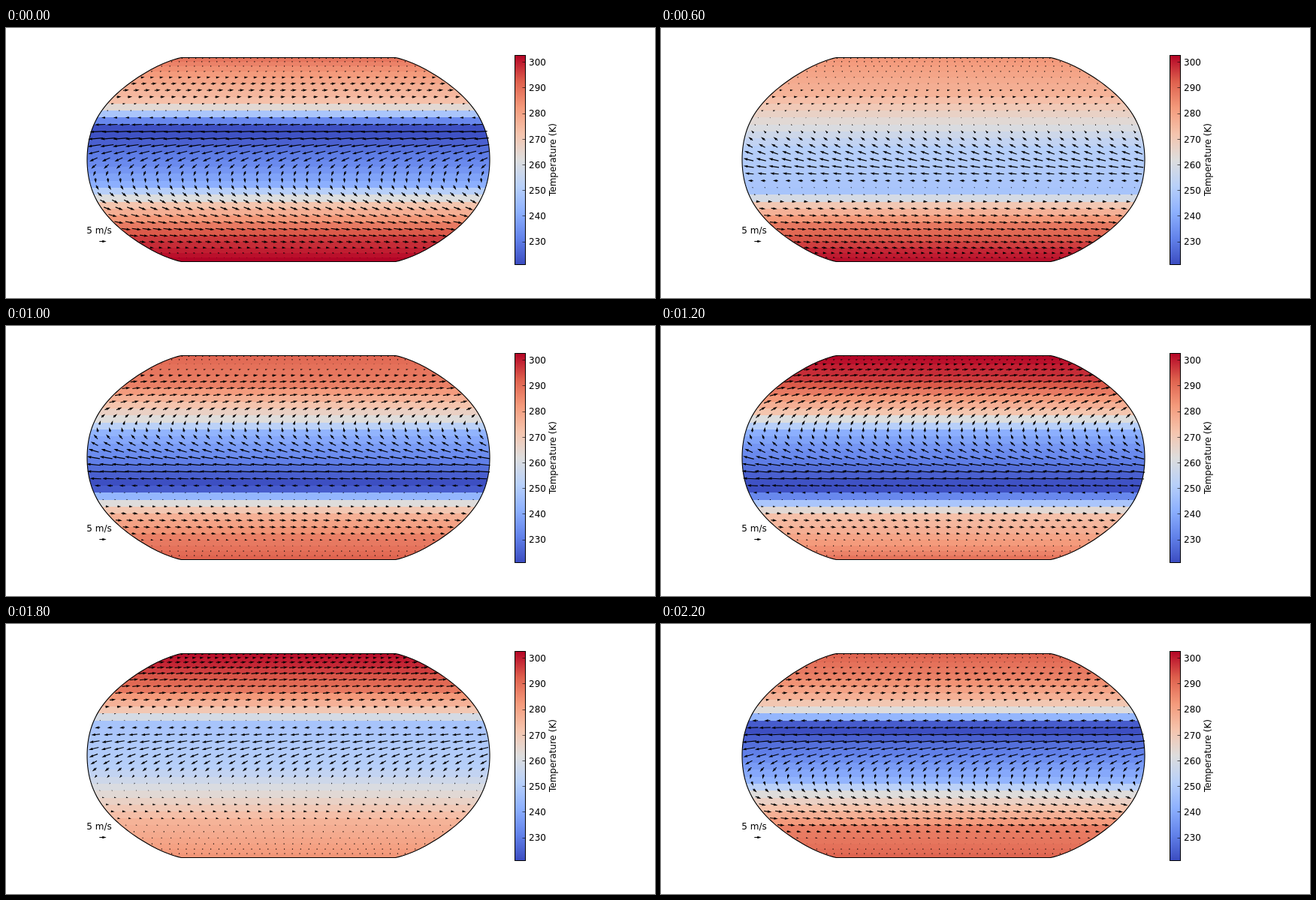
Write an HTML page that moves like this. It is 864 px wide and 360 px high and loops after 2.4 s.

```html
<!DOCTYPE html>
<html lang="en">
<head>
<meta charset="utf-8">
<title>Seasonal winds</title>
<style>
  html, body { margin: 0; width: 100%; height: 100%; overflow: hidden; background: #fff; }
  svg { display: block; width: 864px; height: 360px; }
  text { font: 12px "DejaVu Sans", sans-serif; }
</style>
</head>
<body>
<svg viewBox="0 0 864 360">
  <defs>
    <clipPath id="globe"><path class="rim"/></clipPath>
    <clipPath id="axes"><rect x="107.5" y="39" width="537" height="273"/></clipPath>
    <linearGradient id="scale" x1="0" y1="1" x2="0" y2="0"></linearGradient>
  </defs>
  <g id="bands" clip-path="url(#globe)" shape-rendering="crispEdges"></g>
  <path id="arrows" clip-path="url(#axes)"/>
  <path class="rim" fill="none" stroke="#000" stroke-width="1.1"/>
  <text x="124" y="274" text-anchor="middle">5 m/s</text>
  <path id="sample"/>
  <rect x="677.5" y="36.5" width="14" height="279" fill="url(#scale)" stroke="#000"/>
  <g id="ticks"></g>
  <text transform="translate(732 175.5) rotate(-90)" text-anchor="middle">Temperature (K)</text>
</svg>
<script>
const FRAME = 200, FRAMES = 12, HALF_YEAR = 6;
const CX = 376, CY = 175.5, HALF_W = 268, HALF_H = 136;
const ROWS = 32, COLUMNS = 32, ROW_STEP = 2 / 32.5; // row step as a share of 90 degrees
const T_MIN = 221.4, T_MAX = 302.8;
const COOLWARM = ["3b4cc0", "6282ea", "8db0fe", "b8d0f9", "dddddd",
  "f5c4ad", "f49a7b", "de604d", "b40426"];

// heat: [row, kelvin] corners of the profile, north to south.
// winds: bumps over the rows, [centre, peak, spread to north, spread to south].
const solstice = {
  heat: [[15.5, 289], [8, 272], [4.8, 222], [3.5, 222.5], [-3.5, 241.5],
    [-6.5, 272], [-11, 296], [-15.5, 303]],
  easterly: [3.4, -21, 1.3, 3.8], northWest: [9.8, 8, 1.8, 1.9],
  southWest: [-10.5, 12.5, 5, 2.3], crossing: [-3, -6.3, 3.4, 3.5]
};
const peak = {
  heat: [[15.5, 286], [11.5, 282], [7.5, 266], [5, 232.5], [3.5, 231],
    [-3.5, 249], [-6.5, 272], [-11.5, 302], [-15.5, 304]],
  easterly: [3.5, -16, 1.9, 4.5], northWest: [10, 5, 1.8, 1.5],
  southWest: [-11.5, 13, 5.2, 2.7], crossing: [-2.2, -6.3, 3.8, 3.5]
};
const equinox = {
  heat: [[15.5, 283], [9.5, 276.5], [1.5, 251.5], [-4.5, 248], [-6.5, 271],
    [-9.5, 288.5], [-13.5, 299], [-15.5, 301.5]],
  easterly: [-1.5, -14.5, 3, 2.1], northWest: [8.4, 5, 1.6, 2.2],
  southWest: [-10.8, 11.8, 4, 2.9], crossing: [1.8, 4.8, 2, 2.7]
};
const turning = {
  heat: [[15.5, 291.5], [10.5, 287], [5.5, 262.5], [3.5, 243], [-3.5, 222],
    [-4.5, 224.5], [-6.5, 262.5], [-8, 275.5], [-11.5, 287], [-15.5, 292]],
  easterly: [-2.3, -20, 3.6, 1.7], northWest: [9.5, 11, 1.9, 4.2],
  southWest: [-10, 9, 2.3, 1.9], crossing: [3.2, 6, 2.4, 3]
};
// Each step averages the states listed for it; the second half year mirrors the first
const STEPS = [[solstice], [peak], [peak, equinox], [equinox], [equinox, turning], [turning]];

const el = id => document.getElementById(id);
const mix = (a, b, t) => a + (b - a) * t;

// Polynomial fit of the Robinson projection; s runs from -1 to 1 between the poles
function halfWidth(s) {
  const q = s * s;
  return HALF_W * (1 - q * (.308 + q * (.5554 + q * (-.6096 + q * .214))));
}
function latY(s) {
  const a = Math.abs(s);
  return CY - Math.sign(s) * HALF_H * (1.116 * a - .116 * a ** 6.3);
}

function bump(row, [centre, height, north, south]) {
  const d = (row - centre) / (row > centre ? north : south);
  return height * Math.exp(-d * d / 2);
}

function heatAt(state, row) {
  const i = Math.max(1, state.heat.findIndex(corner => corner[0] <= row));
  const [r0, t0] = state.heat[i - 1], [r1, t1] = state.heat[i];
  return mix(t0, t1, (row - r0) / (r1 - r0));
}

function climate(state, row) {
  const north = bump(row, state.northWest), south = bump(row, state.southWest);
  return {
    heat: heatAt(state, row),
    u: bump(row, state.easterly) + north + south,
    v: bump(row, state.crossing) + .1 * (north - south)
  };
}

function sample(step, row) {
  const flip = step < HALF_YEAR ? 1 : -1;
  const parts = STEPS[step % HALF_YEAR].map(state => climate(state, row * flip));
  const mean = key => parts.reduce((sum, part) => sum + part[key], 0) / parts.length;
  return { heat: mean("heat"), u: mean("u"), v: mean("v") * flip };
}

function heatColor(kelvin) {
  const last = COOLWARM.length - 1;
  const p = Math.max(0, Math.min(1, (kelvin - T_MIN) / (T_MAX - T_MIN))) * last;
  const i = Math.min(last - 1, Math.floor(p));
  const channel = (hex, c) => parseInt(hex.slice(c * 2, c * 2 + 2), 16);
  return `rgb(${[0, 1, 2].map(c =>
    Math.round(mix(channel(COOLWARM[i], c), channel(COOLWARM[i + 1], c), p - i)))})`;
}

// Arrow centred on (x, y); short ones shrink as a whole, tiny ones become dots
function arrow(x, y, u, v) {
  const w = 1.15, head = 5 * w, length = Math.hypot(u, v);
  if (length < w) return `M${x - w / 2} ${y - w / 2}h${w}v${w}h${-w}Z`;
  const s = Math.min(1, length / head), tip = length / 2;
  const neck = tip - 4.5 * w * s, barb = tip - head * s, h = w * s / 2;
  const points = [[-tip, h], [neck, h], [barb, 3 * h], [tip, 0],
    [barb, -3 * h], [neck, -h], [-tip, -h]];
  const c = u / length, n = -v / length;
  return "M" + points.map(([px, py]) =>
    `${(x + px * c - py * n).toFixed(2)} ${(y + px * n + py * c).toFixed(2)}`).join("L") + "Z";
}

function make(tag, parent, attributes) {
  const node = document.createElementNS("http://www.w3.org/2000/svg", tag);
  for (const name in attributes) node.setAttribute(name, attributes[name]);
  return parent.appendChild(node);
}

const east = [], west = [];
for (let i = -50; i <= 50; i++) {
  const s = i / 50, w = halfWidth(s), y = latY(s);
  east.push(`${CX + w} ${y}`);
  west.unshift(`${CX - w} ${y}`);
}
document.querySelectorAll(".rim").forEach(path =>
  path.setAttribute("d", `M${[...east, ...west].join("L")}Z`));

COOLWARM.forEach((hex, i) => make("stop", el("scale"),
  { offset: i / (COOLWARM.length - 1), "stop-color": "#" + hex }));
for (let kelvin = 230; kelvin <= 300; kelvin += 10) {
  const y = 45.6 + (300 - kelvin) * 3.42;
  make("path", el("ticks"), { d: `M687.5 ${Math.floor(y) + .5}h4`, stroke: "#000", "stroke-width": .6 });
  make("text", el("ticks"), { x: 696, y: Math.round(y + 4.4) }).textContent = kelvin;
}
el("sample").setAttribute("d", arrow(129, 284.5, 9.4, 0));

// Each band has its row of arrows along the northern edge
const bands = Array.from({ length: ROWS }, (_, i) => {
  const row = (ROWS - 1) / 2 - i, edge = (row + .5) * ROW_STEP;
  const y = latY(edge);
  const top = i ? y : CY - HALF_H;
  const bottom = i < ROWS - 1 ? latY(edge - ROW_STEP) : CY + HALF_H;
  const rect = make("rect", el("bands"), { x: 100, y: top, width: 552, height: bottom - top });
  return { row, y, rect, reach: halfWidth(edge) };
});

function draw(step) {
  let arrows = "";
  for (const { row, y, rect, reach } of bands) {
    const { heat, u, v } = sample(step, row);
    rect.setAttribute("fill", heatColor(heat));
    for (let i = 0; i < COLUMNS; i++) {
      arrows += arrow(CX + reach * ((2 * i + 1) / COLUMNS - 1), y, u, v);
    }
  }
  el("arrows").setAttribute("d", arrows);
}

let shown = -1;
const start = performance.now();
function tick() {
  const step = Math.floor((performance.now() - start) / FRAME) % FRAMES;
  if (step !== shown) draw(shown = step);
  requestAnimationFrame(tick);
}
tick();
</script>
</body>
</html>
```
